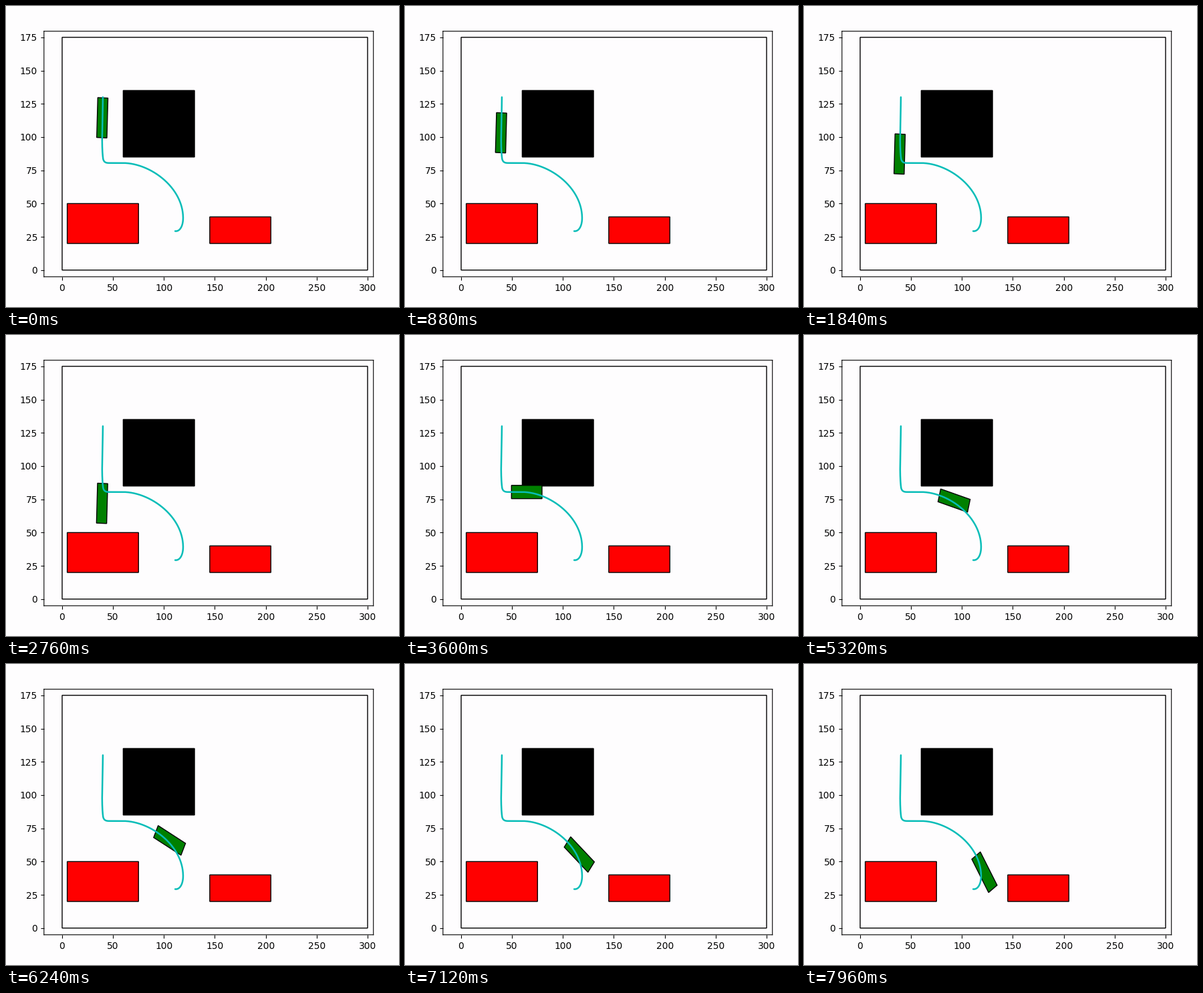
Recreate the animation shown at these times as a matplotlib script. Size 588 px wide and 450 px high, loop 8 s.

```python
import numpy as np
import matplotlib.pyplot as plt
from matplotlib.animation import FuncAnimation
from matplotlib.patches import Polygon, Rectangle

W, H, DPI = 588, 450, 100
FRAMES, STEP_MS = 200, 40
SX, SY = 457 / 300, 348 / 175      # pixels per data unit
X0, Y0 = 84, 394.8                 # pixel position of the data origin
LEFT, RIGHT, TOP, BOTTOM = 56.8, 549.7, 37.7, 404.8

LENGTH, WIDTH = 30, 10
START, SPEED, RAMP = 0.5, 0.665, 10   # units, units per frame, frames
START_HEADING = np.radians(-92)
BACK = "#fefdfe"

plt.rcParams["font.family"] = "DejaVu Sans"
plt.rcParams["path.snap"] = False


def bezier(a, b, c, d, n=200):
    t = np.linspace(0, 1, n)[:, None]
    a, b, c, d = (np.array(p) for p in (a, b, c, d))
    return (1-t)**3 * a + 3*t*(1-t)**2 * b + 3*t**2*(1-t) * c + t**3 * d


down = bezier((40, 130), (39.9, 115), (38.4, 97), (40, 85))
corner = bezier((40, 85), (40.3, 81), (43, 80.5), (46, 80.5))
sweep = bezier((59.7, 80.5), (86.3, 80.5), (118.8, 62.3), (118.8, 39.1))
hook = bezier((118.8, 39.1), (118.8, 33), (115.5, 28.8), (111, 29.3))
path = np.vstack([down, corner[1:], sweep, hook[1:]])

dist = np.r_[0, np.cumsum(np.hypot(*np.diff(path, axis=0).T))]
turn_start = dist[len(down) - 1] - 1


def at(s):
    return np.array([np.interp(s, dist, path[:, k]) for k in (0, 1)])


def travelled(frame):
    """Distance after an even acceleration followed by steady speed."""
    t = frame**2 / (2 * RAMP) if frame < RAMP else frame - RAMP / 2
    return START + SPEED * t


def car_corners(frame):
    s = travelled(frame)
    rear = at(s)
    if s < turn_start:
        angle = START_HEADING
    else:
        dx, dy = at(s + 1) - at(s - 1)
        angle = np.arctan2(dy, dx)
    ahead = np.array([np.cos(angle), np.sin(angle)])
    side = np.array([-ahead[1], ahead[0]]) * WIDTH / 2
    front = rear + LENGTH * ahead
    return [rear + side, front + side, front - side, rear - side]


fig = plt.figure(figsize=(W / DPI, H / DPI), dpi=DPI, facecolor=BACK)
ax = fig.add_axes([LEFT / W, 1 - BOTTOM / H, (RIGHT - LEFT) / W, (BOTTOM - TOP) / H],
                  facecolor=BACK)
ax.set_xlim((LEFT - X0) / SX, (RIGHT - X0) / SX)
ax.set_ylim((Y0 - BOTTOM) / SY, (Y0 - TOP) / SY)
ax.set_xticks(range(0, 301, 50))
ax.set_yticks(range(0, 176, 25))
ax.tick_params(labelsize=9.93)


def block(x, y, w, h, color):
    ax.add_patch(Rectangle((x, y), w, h, facecolor=color, edgecolor="black", lw=1))


block(0, 0, 300, 175, "none")
block(60, 85, 70, 50, "black")
block(5, 20, 70, 30, "red")
block(145, 20, 60, 20, "red")

car = ax.add_patch(Polygon(car_corners(0), closed=True, facecolor="green",
                           edgecolor="black", lw=1, zorder=2))
ax.plot(*path.T, color="#08bdb8", lw=1.8, solid_capstyle="round", zorder=3)


def update(frame):
    car.set_xy(car_corners(frame))
    return [car]


anim = FuncAnimation(fig, update, frames=FRAMES, interval=STEP_MS,
                     repeat=True, repeat_delay=0, blit=False)
plt.show()
```
